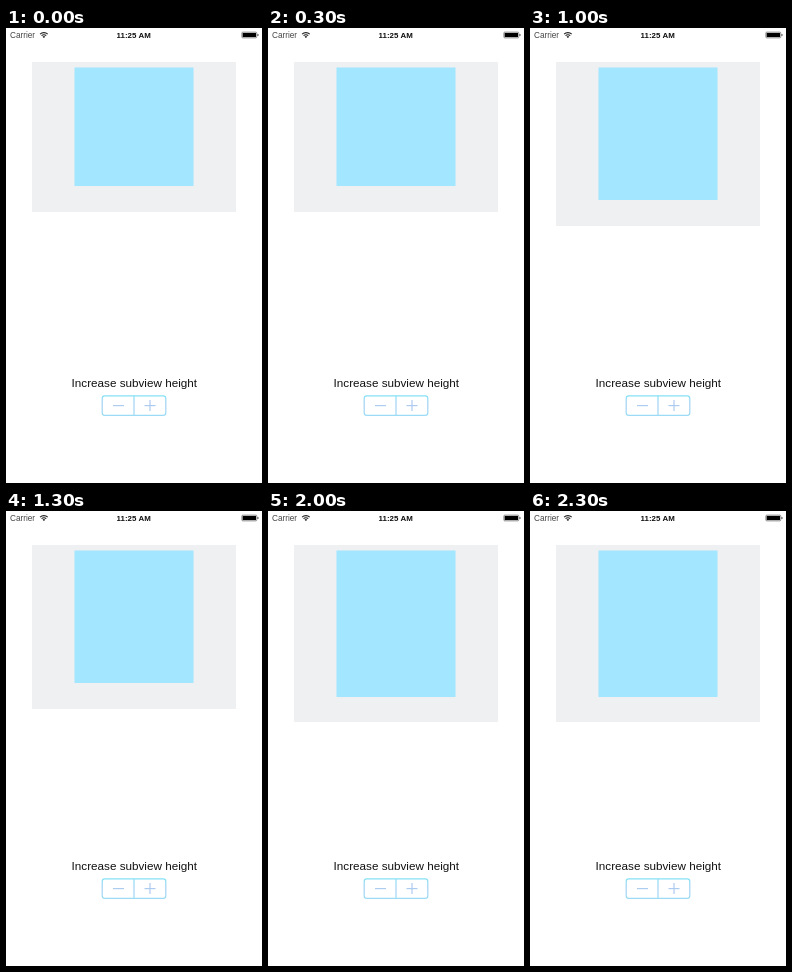
Recreate the animation shown at these times as an HTML page with a canvas. Size 256x455 px, loop 2.5 s.

```html
<!DOCTYPE html>
<html lang="en">
<head>
<meta charset="utf-8">
<title>Subview height</title>
<style>
  html, body { margin: 0; width: 100%; height: 100%; overflow: hidden; background: #fff; }
  canvas { display: block; }
</style>
</head>
<body>
<canvas id="stage" width="256" height="455"></canvas>
<script>
const ctx = document.getElementById('stage').getContext('2d');
const STEP_MS = 500, STEPS = 5;
const GROWTH = 10 * 256 / 375; // ten points per tap
const FONT = '"Liberation Sans", Arial, sans-serif';

function box(color, x, y, w, h) {
  ctx.fillStyle = color;
  ctx.fillRect(x, y, w, h);
}

function text(str, x, y, size, color, align = 'left', weight = 'normal') {
  ctx.font = `${weight} ${size}px ${FONT}`;
  ctx.textAlign = align;
  ctx.fillStyle = color;
  ctx.fillText(str, x, y);
}

function wifi(x, y) {
  ctx.strokeStyle = '#222';
  ctx.lineWidth = 1.1;
  for (const r of [3.3, 5.4]) {
    ctx.beginPath();
    ctx.arc(x, y, r, -Math.PI * 0.75, -Math.PI * 0.25);
    ctx.stroke();
  }
  ctx.fillStyle = '#222';
  ctx.beginPath();
  ctx.moveTo(x, y);
  ctx.arc(x, y, 1.9, -Math.PI * 0.75, -Math.PI * 0.25);
  ctx.fill();
}

function battery() {
  ctx.strokeStyle = '#555';
  ctx.lineWidth = 0.6;
  ctx.beginPath();
  ctx.roundRect(235.8, 4.1, 15, 5.8, 1);
  ctx.stroke();
  box('#000', 236.6, 4.9, 13.4, 4.2);
  box('#333', 251.5, 6, 0.9, 2);
}

function statusBar() {
  text('Carrier', 4, 10, 8.2, '#444');
  wifi(37.9, 10);
  text('11:25 AM', 127.7, 10, 7.9, '#111', 'center', 'bold');
  battery();
}

function stepper() {
  const tint = ctx.createLinearGradient(0, 367, 0, 388);
  tint.addColorStop(0, '#83e2f6');
  tint.addColorStop(0.5, '#a5cff2');
  tint.addColorStop(1, '#9bdcf6');
  ctx.strokeStyle = tint;
  ctx.lineWidth = 1.2;
  ctx.beginPath();
  ctx.roundRect(96.2, 367.9, 63.6, 19.4, 2.6);
  ctx.moveTo(128, 368);
  ctx.lineTo(128, 387.2);
  ctx.stroke();
  const sign = '#aecbf0';
  box(sign, 107, 377, 11, 1.2);
  box(sign, 138.5, 377, 11, 1.2);
  box(sign, 143.4, 372, 1.2, 11);
}

function draw(now) {
  const taps = Math.floor(now / STEP_MS) % STEPS;
  const bottom = base => Math.round(base + taps * GROWTH);
  box('#fff', 0, 0, 256, 455);
  statusBar();
  box('#eff0f2', 26, 34, 204, bottom(184.1) - 34);
  box('#a2e6ff', 68.5, 39.5, 119, bottom(158.3) - 39.5);
  text('Increase subview height', 128.3, 359, 11.7, '#111', 'center');
  stepper();
}

let start;
function tick(now) {
  start ??= now;
  draw(now - start);
  requestAnimationFrame(tick);
}
draw(0);
requestAnimationFrame(tick);
</script>
</body>
</html>
```
